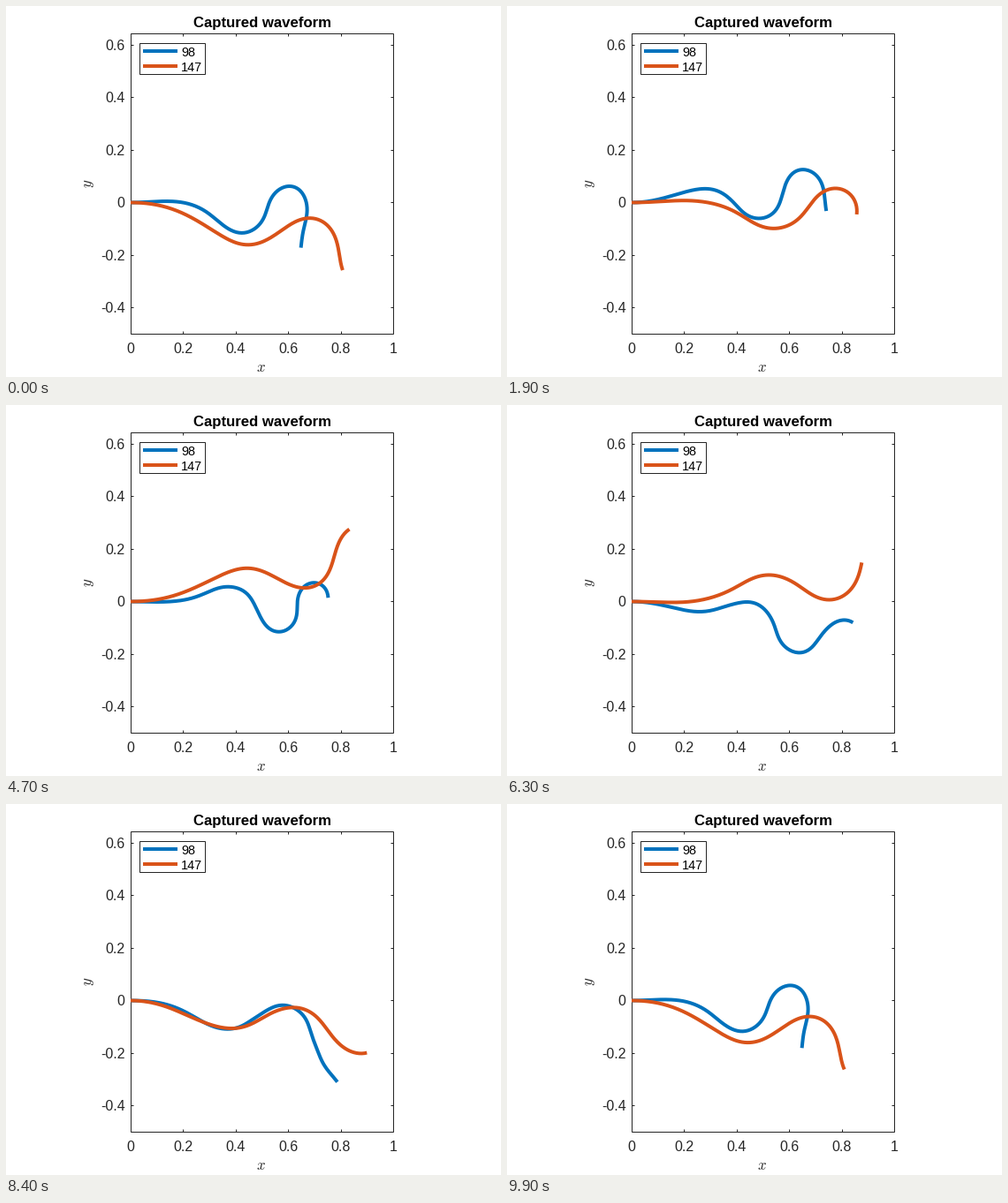
A matplotlib script for the animation above (10 s loop, 560x420 px).

```python
import numpy as np
import matplotlib.pyplot as plt
from matplotlib.animation import FuncAnimation
from matplotlib.patches import Rectangle

plt.rcParams["font.family"] = "Liberation Sans"
plt.rcParams["mathtext.fontset"] = "cm"

W, H, DPI = 560, 420, 100
PX = 72 / DPI                      # points per pixel
X0, Y0, UNIT = 141, 222.5, 297.5   # data origin and scale in pixels
INK = "#262626"
FRAMES, STEP = 100, 100
SEGMENTS = 200
ARC = (np.arange(SEGMENTS) + 0.5) / SEGMENTS


def profile(*values):
    """Smooth curve along the arc through evenly spaced values."""
    v = np.array(values, float)
    slope = np.gradient(v)
    x = ARC * (len(v) - 1)
    k = x.astype(int)
    f = x - k
    g = 1 - f
    return (g * g * (v[k] * (1 + 2 * f) + slope[k] * f)
            + f * f * (v[k + 1] * (1 + 2 * g) - slope[k + 1] * g))


class Strand:
    """Travelling wave of the tangent angle, in degrees, from root to tip."""

    def __init__(self, name, color, mean, swing, lag, ripple=0):
        self.name, self.color = name, color
        self.mean, self.swing, self.lag = mean, swing, lag
        self.ripple = ripple * ARC ** 2

    def angle(self, phase):
        return (self.mean
                + self.swing * np.cos(np.radians(phase - self.lag))
                + self.ripple * np.cos(np.radians(2 * phase + 10 - 520 * ARC)))

    def path(self, phase):
        psi = np.radians(self.angle(phase))
        ds = UNIT / SEGMENTS
        return (X0 + ds * np.r_[0, np.cumsum(np.cos(psi))],
                Y0 - ds * np.r_[0, np.cumsum(np.sin(psi))])


STRANDS = [
    Strand("98", "#0072BD",
           mean=profile(0, 0, -2, -4.5, -15, -13.3, 3.8, 16.4, 3.4, -36.6, -71),
           swing=profile(0, 13, 23, 30, 31, 50, 73, 67, 80, 69, 30),
           lag=profile(55, 79, 111, 164, 245, 335, 387, 451, 521, 561, 613),
           ripple=20),
    Strand("147", "#D95319",
           mean=profile(0, -2.8, -2, 2.5, 7.4, -11.5),
           swing=profile(0, 24, 31, 31.5, 61.5, 90),
           lag=profile(125, 152, 215, 363, 493, 589)),
]

fig = plt.figure(figsize=(W / DPI, H / DPI), dpi=DPI, facecolor="white")
ax = fig.add_axes([0, 0, 1, 1])
ax.set_xlim(0, W)
ax.set_ylim(H, 0)
ax.axis("off")


def stroke(xs, ys, color=INK, width=1, z=2):
    return ax.plot(xs, ys, color=color, lw=width * PX, zorder=z,
                   solid_capstyle="butt", solid_joinstyle="round")[0]


def label(x, y, text, size, color=INK, **kw):
    ax.text(x, y, text, fontsize=size * PX, color=color, **kw)


def box(x, y, w, h, z):
    ax.add_patch(Rectangle((x, y), w, h, fc="white", ec=INK, lw=PX, zorder=z))


LEFT, RIGHT, TOP, BOTTOM, TICK = 141, 438, 31, 371, 3
box(LEFT, TOP, RIGHT - LEFT, BOTTOM - TOP, 1)
for v in np.arange(6) / 5:
    x = X0 + v * UNIT
    label(x - 0.3, 393, f"{v:g}", 16, ha="center", va="baseline")
    if 0 < v < 1:
        stroke([x - 0.5] * 2, [BOTTOM, BOTTOM - TICK])
        stroke([x - 0.5] * 2, [TOP, TOP + TICK])
for v in np.arange(-2, 4) / 5:
    y = Y0 - v * UNIT
    label(134.5, y + 5.8, f"{v:g}", 16, ha="right", va="baseline")
    stroke([LEFT, LEFT + TICK], [y - 0.5] * 2)
    stroke([RIGHT, RIGHT - TICK], [y - 0.5] * 2)

label(290, 24, "Captured waveform", 16.8, "black", weight="bold",
      ha="center", va="baseline")
label(288.7, 409, "$x$", 17, ha="center", va="center")
label(95, 200.7, "$y$", 17, ha="center", va="center", rotation=90)

box(151, 42, 74, 35, 5)
lines = []
for i, s in enumerate(STRANDS):
    y = 51 + 17 * i
    stroke([155, 194], [y, y], s.color, 4, 6)
    label(198, y + 5.9, s.name, 14.4, "black", va="baseline", zorder=6)
    lines.append(stroke([], [], s.color, 4, 3 + i / 2))


def draw(i):
    for line, s in zip(lines, STRANDS):
        line.set_data(*s.path(360 * i / FRAMES))
    return lines


anim = FuncAnimation(fig, draw, frames=FRAMES, interval=STEP, repeat=True)
plt.show()
```
